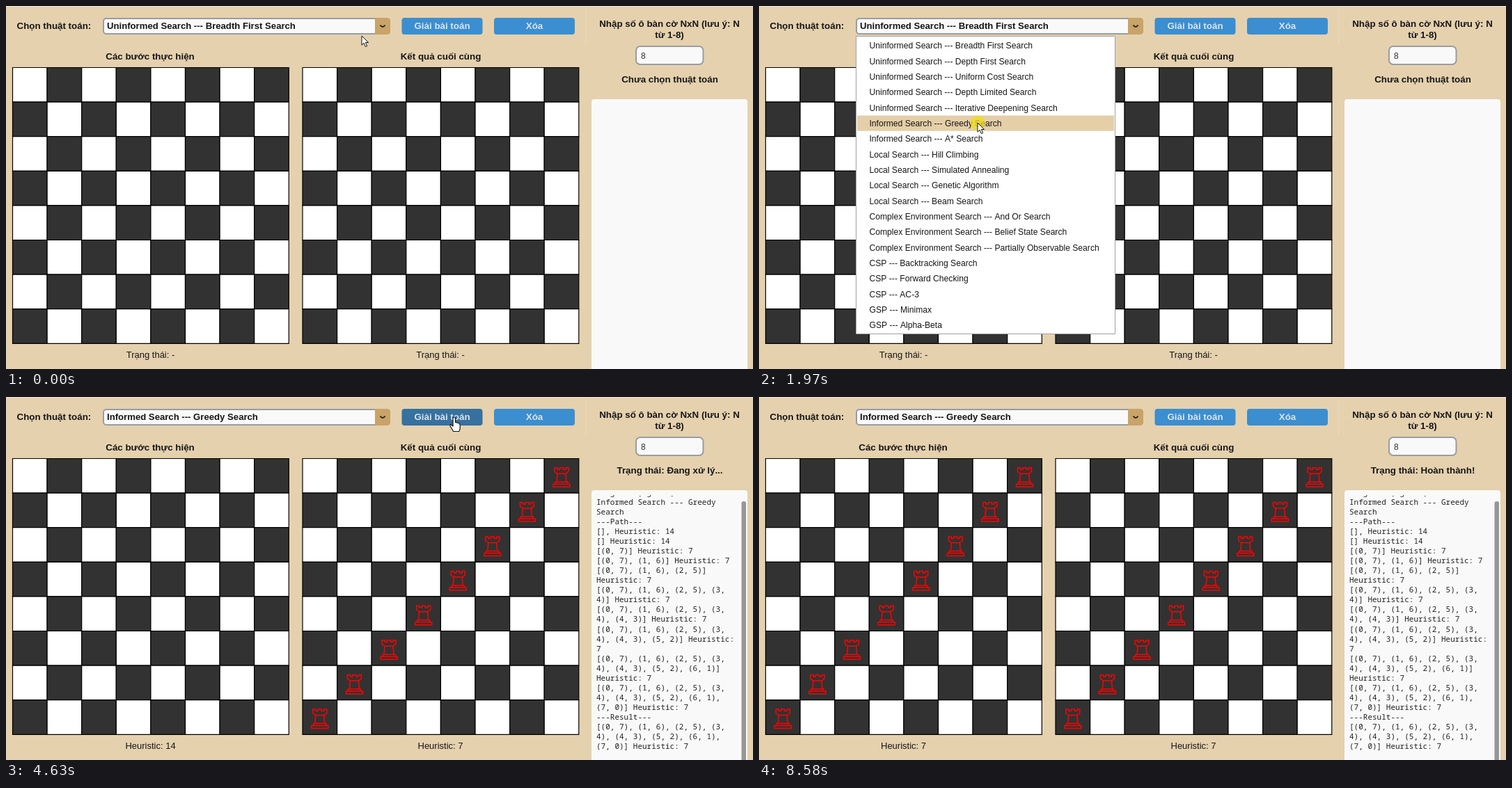
Animation of 1073x522 px, one loop 8.91 s. Source, as an HTML page with a canvas:

```html
<!DOCTYPE html>
<html lang="vi">
<head>
<meta charset="utf-8">
<title>N rooks search</title>
<style>
  html, body { margin: 0; width: 100%; height: 100%; overflow: hidden; background: #e5d1ae; }
  canvas { display: block; }
</style>
</head>
<body>
<canvas id="stage" width="1073" height="522"></canvas>
<script>
const ctx = document.getElementById('stage').getContext('2d');
const LOOP = 8910, STEP = 67, CELL = 49.6;
const SANS = '"Liberation Sans", Arial, sans-serif';
const MONO = '"Noto Sans Mono", monospace';
const INK = '#161616', TAN = '#e5d1ae', PAPER = '#f9f9fa', BORDER = '#979da2';

const T = { open: 600, menuClickEnd: 940, pick: 1940, close: 2100, solve: 3760, busy: 3830,
  result: 4030, scrollbar: 4430, leftRooks: [4630, 4830, 5030, 5300, 5500, 5700, 5920, 6120], done: 6390 };

const algorithms = [
  ...['Breadth First', 'Depth First', 'Uniform Cost', 'Depth Limited', 'Iterative Deepening']
    .map(s => `Uninformed Search --- ${s} Search`),
  ...['Greedy', 'A*'].map(s => `Informed Search --- ${s} Search`),
  ...['Hill Climbing', 'Simulated Annealing', 'Genetic Algorithm', 'Beam Search'].map(s => `Local Search --- ${s}`),
  ...['And Or', 'Belief State', 'Partially Observable'].map(s => `Complex Environment Search --- ${s} Search`),
  ...['Backtracking Search', 'Forward Checking', 'AC-3'].map(s => `CSP --- ${s}`),
  'GSP --- Minimax', 'GSP --- Alpha-Beta'];

// The log, word-wrapped to the width of its box
function wrap(line, columns = 30) {
  const rows = [''];
  for (const word of line.split(' ')) {
    const last = rows[rows.length - 1], joined = last ? last + ' ' + word : word;
    if (joined.length <= columns) rows[rows.length - 1] = joined;
    else rows.push(word);
  }
  return rows;
}
const path = n => `[${Array.from({ length: n }, (_, i) => `(${i}, ${7 - i})`).join(', ')}] Heuristic: ${n ? 7 : 14}`;
const log = ['Đang sử dụng thuật toán:', algorithms[5], '---Path---', '[], Heuristic: 14',
  ...Array.from({ length: 9 }, (_, n) => path(n)), '---Result---', path(8)].flatMap(line => wrap(line));

// Pointer positions: time, x, y
const route = [[0, 511, 43], [70, 511, 43], [470, 541, 29], [960, 541, 29], [1430, 314, 183], [1590, 314, 183],
  [1770, 314, 168], [2400, 314, 168], [2720, 836, 66], [2940, 715, 48], [3290, 648, 35], [3340, 648, 35],
  [3430, 644, 30], [7000, 644, 30], [7050, 649, 30], [7890, 907, 200], [8580, 1020, 526], [LOOP, 1020, 526]];

function pointerAt(t) {
  const i = route.findIndex(p => p[0] > t), [t0, x0, y0] = route[i - 1], [t1, x1, y1] = route[i];
  const p = (t - t0) / (t1 - t0), e = p * p * (3 - 2 * p);
  return { x: x0 + (x1 - x0) * e, y: y0 + (y1 - y0) * e };
}

const inside = (p, x, y, w, h) => p.x >= x && p.x < x + w && p.y >= y && p.y < y + h;

function text(str, x, y, { size = 13.35, bold = true, align = 'center', color = INK, family = SANS } = {}) {
  ctx.font = `${bold ? 'bold ' : ''}${size}px ${family}`;
  ctx.textAlign = align;
  ctx.fillStyle = color;
  ctx.fillText(str, x, y + size * 0.36);
}

function box(x, y, w, h, fill, radius = 0, stroke, width = 1) {
  ctx.beginPath();
  ctx.roundRect(x, y, w, h, radius);
  ctx.fillStyle = fill;
  ctx.fill();
  if (!stroke) return;
  ctx.strokeStyle = stroke;
  ctx.lineWidth = width;
  ctx.stroke();
}

function shape(d, x, y, stroke, width, fill) {
  const outline = new Path2D(d);
  ctx.save();
  ctx.translate(x, y);
  ctx.lineJoin = 'round';
  if (fill) { ctx.fillStyle = fill; ctx.fill(outline); }
  ctx.strokeStyle = stroke;
  ctx.lineWidth = width;
  ctx.stroke(outline);
  ctx.restore();
}

const ROOK = 'M-10-13h4v2.5h3.5v-2.5h5v2.5h3.5v-2.5h4v5.5l-3.5 3h-13l-3.5-3z' +
  'M-6-4.5l-1 12M6-4.5l1 12M-9 7.5h18v3h-18zM-12 10.5h24v4h-24z';
const ARROW = 'M0 0v13.2l3.1-2.9 2.2 5.3 2.4-1-2.3-5.1h4.2z';
const HAND = 'M-2 1q0-2 1.8-2t1.7 2v5.5l4.5 1q2.2.6 2.2 3v4q0 2.5-1.5 5h-8l-4.5-7.5q-1.2-2 .5-2.6l3.3 2.6z';

function board(x, rooks, label) {
  const y = 88.5;
  for (let r = 0; r < 8; r++)
    for (let c = 0; c < 8; c++)
      box(x + c * CELL, y + r * CELL, CELL, CELL, (r + c) % 2 ? '#323232' : '#fff', 0, '#000', 1.2);
  for (let r = 0; r < rooks; r++)
    shape(ROOK, x + (7.5 - r) * CELL, y + (r + 0.5) * CELL + 1.5, '#f00', 1.5);
  text(label, x + 198, 501.5, { size: 13, bold: false });
}

function button(label, x, hovered) {
  box(x, 17, 116, 24, hovered ? '#36719f' : '#3b8ed0', 4);
  text(label, x + 58, 28.5, { color: '#dce4ee' });
}

function combo(value, hovered) {
  box(140, 18, 411, 22, PAPER, 4, BORDER, 2);
  box(530, 17, 22, 24, hovered ? '#b08c62' : '#c9a367', [0, 5, 5, 0]);
  shape('M-3.5-1.5Q0 3.5 3.5-1.5', 541, 29, '#222', 1.8);
  text(value, 145, 28.5, { size: 13.15, align: 'left' });
}

function menu(pointer) {
  box(139.5, 43.5, 372, 428, '#fff', 0, '#a0a0a0');
  algorithms.forEach((name, i) => {
    const y = 57 + i * 22.33;
    if (inside(pointer, 141, y - 11.2, 369, 22.33)) box(141, y - 11.2, 369, 22.33, '#e4cfa8');
    text(name, 158.5, y, { size: 12.13, bold: false, align: 'left' });
  });
}

function sidebar(t) {
  box(832.5, 0, 1, 56, '#eadcc2');
  text('Nhập số ô bàn cờ NxN (lưu ý: N', 953, 25);
  text('từ 1-8)', 953, 41);
  box(905, 58, 96.5, 26, PAPER, 6, BORDER, 2);
  text('8', 912, 71.5, { size: 12, bold: false, align: 'left', color: '#333' });
  text(t < T.busy ? 'Chưa chọn thuật toán' : t < T.done ? 'Trạng thái: Đang xử lý...' : 'Trạng thái: Hoàn thành!', 953.5, 105);
  box(841, 134, 224, 400, PAPER, 4);
  if (t < T.result) return;
  ctx.save();
  ctx.beginPath();
  ctx.rect(841, 141, 224, 381);
  ctx.clip();
  log.forEach((line, i) => text(line, 848, 137 + i * 14.04, { size: 11, bold: false, align: 'left', family: MONO, color: '#222' }));
  ctx.restore();
  if (t >= T.scrollbar) box(1056.5, 150, 6.5, 380, '#979797', 3);
}

function draw(t) {
  const pointer = pointerAt(t);
  const onSolve = inside(pointer, 569, 17, 116, 24);
  const solved = t >= T.result;
  const leftRooks = T.leftRooks.filter(at => t >= at).length;
  const idle = 'Trạng thái: -';

  box(0, 0, 1073, 522, TAN);
  box(0, 0, 1073, 1, '#f0e6d3');
  text('Chọn thuật toán:', 15.5, 28.5, { align: 'left' });
  combo(algorithms[t < T.close ? 0 : 5], inside(pointer, 530, 17, 22, 24));
  button('Giải bài toán', 568.5, onSolve);
  button('Xóa', 701, inside(pointer, 701, 17, 116, 24));
  text('Các bước thực hiện', 207, 72);
  text('Kết quả cuối cùng', 624.5, 72);
  board(9.5, leftRooks, solved ? `Heuristic: ${leftRooks ? 7 : 14}` : idle);
  board(426, solved ? 8 : 0, solved ? 'Heuristic: 7' : idle);
  sidebar(t);
  if (t >= T.open && t < T.close) menu(pointer);

  const clicking = [[T.open, T.menuClickEnd], [T.pick, T.close], [T.solve, T.solve + 140]]
    .some(([from, to]) => t >= from && t < to);
  if (clicking) box(pointer.x - 10.5, pointer.y - 10.5, 21, 21, 'rgba(238,220,25,.76)', 10.5);
  if (onSolve) shape(HAND, pointer.x, pointer.y, '#111', 1.2, '#fff');
  else shape(ARROW, pointer.x, pointer.y, '#111', 1, '#fff');
}

function tick() {
  const t = performance.now() % LOOP;
  draw(Math.floor(t / STEP) * STEP);
  requestAnimationFrame(tick);
}
tick();
</script>
</body>
</html>
```
